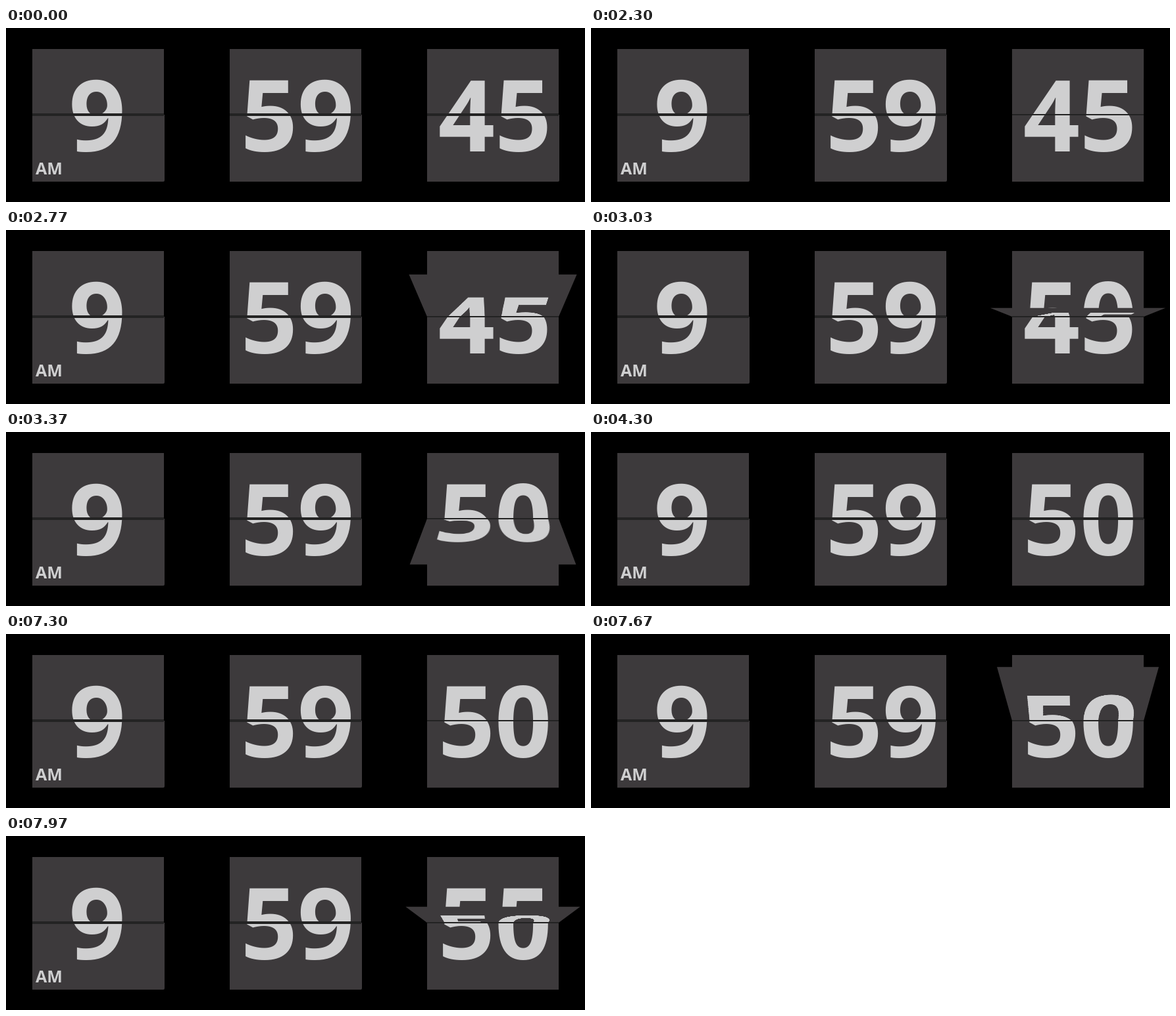
These frames come from a looping animation (880x265 px, 8 s). An HTML page:

```html
<!DOCTYPE html>
<html lang="en">
<head>
<meta charset="utf-8">
<title>Flip clock</title>
<style>
  html, body { margin: 0; width: 100%; height: 100%; overflow: hidden; background: #000; }
  .tile { position: absolute; top: 32px; width: 200px; height: 202px; perspective: 400px; perspective-origin: 50% 100px; }
  svg { position: absolute; left: 0; display: block; background: #3d3a3c; }
  text { font: bold 151px "Open Sans", "Noto Sans", sans-serif; fill: #cfcfd0; }
  .am { font-size: 25px; }
  .upper { top: 0; transform-origin: 50% 100%; }
  .lower { top: 100px; transform-origin: 50% 0; }
  .line { position: absolute; left: 0; top: 98px; width: 200px; height: 4px; background: #232323; }
  .rest .base.lower { width: 201px; border-radius: 0 0 2px 0; }
  .flipping .line { top: 99px; height: 2px; }
</style>
</head>
<body>
<script>
const LOOP = 8000, FALL = 830, LAND = 800;
const FLIPS = [{ start: 2300, from: '45', to: '50' }, { start: 7300, from: '50', to: '55' }];

// One half of a card, showing its part of the same 200 x 202 face.
function half(side, role, textX, extra = '') {
  const [y, h] = side === 'upper' ? [0, 100] : [100, role === 'base' ? 102 : 100];
  return `<svg class="${role} ${side}" width="200" height="${h}" viewBox="0 ${y} 200 ${h}"
    preserveAspectRatio="xMinYMin"><text class="num" x="${textX}" y="156" text-anchor="middle"></text>${extra}</svg>`;
}

function addTile(left, value, textX, extra) {
  const tile = document.createElement('div');
  tile.className = 'tile rest';
  tile.style.left = left + 'px';
  tile.innerHTML = half('upper', 'base', textX) + half('lower', 'base', textX, extra) +
    half('upper', 'flap', textX) + half('lower', 'flap', textX) + '<div class="line"></div>';
  document.body.append(tile);
  const parts = [...tile.querySelectorAll('svg')];
  const setText = (svg, s) => {
    const label = svg.querySelector('.num');
    if (label.textContent !== s) label.textContent = s;
  };
  const pose = (svg, angle) => {
    svg.style.display = angle === null ? 'none' : 'block';
    if (angle !== null) svg.style.transform = `rotateX(${angle}deg)`;
  };

  // The first flap falls to level, then the second one lands on the lower half.
  const show = (from, to = from, elapsed = 0) => {
    const [top, bottom, fall, land] = parts;
    const moving = elapsed > 0 && elapsed < FALL + LAND;
    const falling = moving && elapsed < FALL;
    const left = falling ? 1 - elapsed / FALL : 1 - (elapsed - FALL) / LAND;
    const angle = moving ? 90 * left ** 1.3 : 0;
    setText(top, elapsed > 0 ? to : from);
    setText(bottom, elapsed >= FALL + LAND ? to : from);
    setText(fall, from);
    setText(land, to);
    pose(fall, falling ? angle - 90 : null);
    pose(land, moving && !falling ? angle : null);
    tile.className = 'tile ' + (moving ? 'flipping' : 'rest');
  };
  show(value);
  return show;
}

addTile(40, '9', 98.5, '<text class="am" x="5" y="191">AM</text>');
addTile(340, '59', 103);
const seconds = addTile(640, '45', 103);

function draw(now) {
  const t = now % LOOP;
  const flip = t < FLIPS[1].start ? FLIPS[0] : FLIPS[1];
  seconds(flip.from, flip.to, Math.max(0, t - flip.start));
  requestAnimationFrame(draw);
}
draw(0);
</script>
</body>
</html>
```
